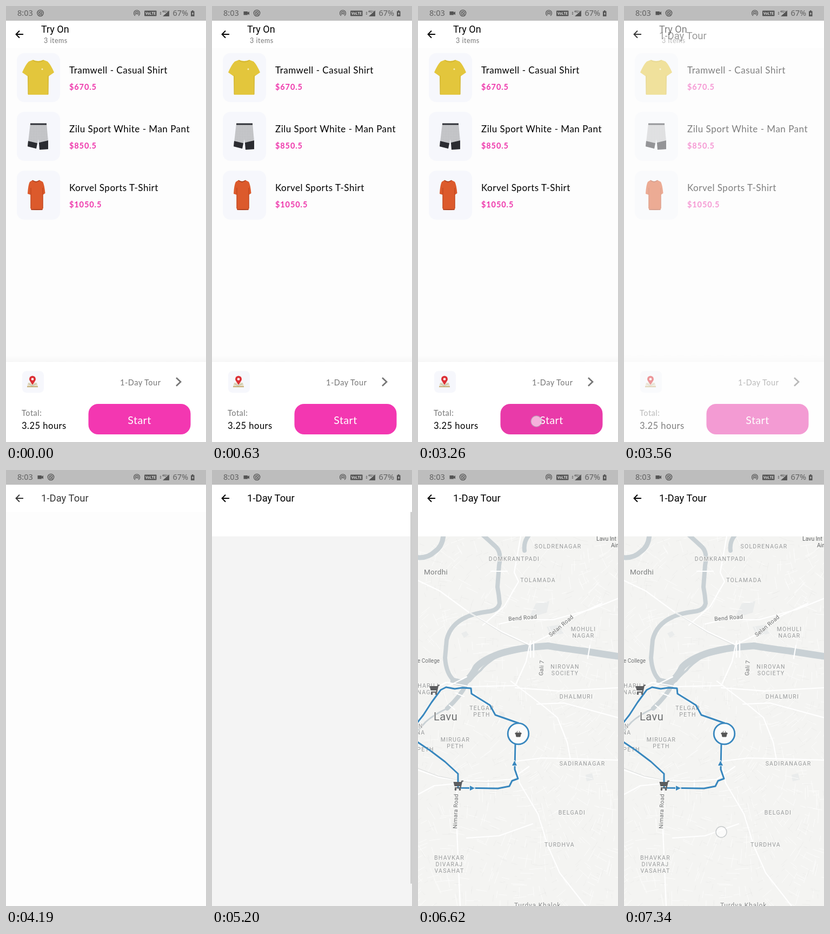
Recreate the animation shown at these times as an HTML page. Size 370 px wide and 801 px high, loop 8 s.

```html
<!DOCTYPE html>
<html lang="en">
<head>
<meta charset="utf-8">
<title>Try On</title>
<style>
  html, body { margin: 0; width: 100%; height: 100%; overflow: hidden; background: #fdfdfd; }
  svg { display: block; width: 370px; height: 801px; }
  .r { font-family: Roboto, sans-serif; }
  .l { font-family: Lato, sans-serif; letter-spacing: .5px; }
  .name { font-size: 17px; }
  .price { font-size: 14.5px; font-weight: 700; fill: #ee36ab; letter-spacing: .9px; }
  .grey { fill: #777; }
  #labels { font-family: Roboto, sans-serif; paint-order: stroke; stroke: #f6f6f4; stroke-width: 2px; stroke-linejoin: round; }
  .area { font-size: 10.5px; letter-spacing: 1.25px; fill: #989a9b; text-anchor: middle; }
  .road { font-size: 10.5px; letter-spacing: .3px; fill: #6d6f70; text-anchor: middle; }
  .line { fill: none; stroke-linecap: round; stroke-linejoin: round; }
</style>
</head>
<body>
<svg viewBox="0 0 370 801">
  <defs>
    <linearGradient id="shade" x2="0" y2="1"><stop stop-color="#fdfdfd"/><stop offset="1" stop-color="#f7f7f7"/></linearGradient>
    <pattern id="knit" width="3" height="3" patternUnits="userSpaceOnUse">
      <rect width="3" height="3" fill="#bfc0c3"/><circle cx="1" cy="1" r=".7" fill="#d9dadd"/>
    </pattern>
    <clipPath id="mapClip"><rect y="122" width="370" height="679"/></clipPath>
    <g id="cart" fill="#5c5d5f">
      <path d="M9-8.500H5.400L4.700-6H-9.500L-7.500 2H3L2.500 4H-7V6H4.200L7-6.500H9Z"/>
      <circle cx="2.500" cy="8" r="1.900"/><circle cx="-5.500" cy="8" r="1.900"/>
    </g>
    <path id="arrow" d="M-4-4.500 5 0-4 4.500Z" fill="#3887be" stroke="#f6f6f4" stroke-width="2" paint-order="stroke"/>
  </defs>

  <rect width="370" height="801" fill="#fdfdfd"/>
  <rect y="27" width="370" height="50" fill="#fff"/>

  <g id="list">
    <text class="r" x="65" y="49" font-size="18">Try On</text>
    <text class="l grey" x="70" y="68" font-size="12.500">3 items</text>
    <g fill="#f6f7fc">
      <rect x="20" y="86.500" width="80" height="90" rx="14"/>
      <rect x="20" y="194.500" width="80" height="90" rx="14"/>
      <rect x="20" y="302.500" width="80" height="90" rx="14"/>
    </g>
    <path d="M50 99Q59.500 103 69 99L77 102Q83 108 89 122L79 129 78 163H41L40 129 30 122Q36 108 42 102Z" fill="#e3c63c"/>
    <path d="M50 100q9.500 6 19 0M41 128v34M78 128v34" class="line" stroke="#cbae2c"/>
    <circle cx="67" cy="116" r="1.500" fill="#f5ecc0"/>
    <path d="M45 216H75L78 248V263L62 264 60 245 56 262 40 258Z" fill="url(#knit)"/>
    <path d="M41 248 58 252 56 262 40 258ZM61 251 78 247V263L62 264Z" fill="#2b2c31"/>
    <path d="M45 217H75" stroke="#303238" stroke-width="3"/>
    <path d="M49 320Q56 324 62 320L68 323Q71 328 72.500 344L68 347V374Q57 376 46 374V347L40 345Q41 328 44 323Z" fill="#dc5a2c"/>
    <path d="M49.500 320.500q6 5 12 0M47 374H67" class="line" stroke="#a63c1c" stroke-width="1.300"/>
    <path d="M46 334v38M68 334v38" stroke="#c34a20" stroke-width="1.500"/>
    <g class="l">
      <text class="name" x="117" y="124">Tramwell - Casual Shirt</text>
      <text class="name" x="117" y="232">Zilu Sport White - Man Pant</text>
      <text class="name" x="117" y="340">Korvel Sports T-Shirt</text>
      <text class="price" x="117" y="154">$670.5</text>
      <text class="price" x="117" y="262">$850.5</text>
      <text class="price" x="117" y="370">$1050.5</text>
    </g>
    <rect y="641" width="370" height="13" fill="url(#shade)"/>
    <rect y="654" width="370" height="147" fill="#fff"/>
    <rect x="30" y="670.500" width="40" height="40" rx="8" fill="#f6f7fc"/>
    <path d="M41 692H57L59 699H39Z" fill="#e6dcc4"/>
    <path d="M42 694 48 698 56 694" class="line" stroke="#a9b8a4"/>
    <path d="M39 699.500H59" stroke="#b6954b" stroke-width="1.300"/>
    <path d="M49 696C44 689 43 687 43 685.500A6 6 0 0 1 55 685.500C55 687 54 689 49 696Z" fill="#dc2f35"/>
    <circle cx="49" cy="685.500" r="2.300" fill="#fff"/>
    <text class="l grey" x="211" y="696.500" font-size="14.500">1-Day Tour</text>
    <path d="M315 683 323 690.500 315 698" fill="none" stroke="#757575" stroke-width="2.700"/>
    <text class="l grey" x="29" y="753" font-size="14.500">Total:</text>
    <text class="l" x="29" y="776.500" font-size="16.500">3.25 hours</text>
    <rect id="button" x="152.500" y="731" width="189" height="56" rx="18"/>
    <text class="l" x="247" y="767.500" font-size="19.500" fill="#fff" text-anchor="middle">Start</text>
  </g>

  <g id="tour">
    <text class="r" x="65" y="58" font-size="18.500">1-Day Tour</text>
  </g>
  <path d="M32 52H19M25 45.500 18.500 52 25 58.500" fill="none" stroke="#000" stroke-width="1.900" id="back"/>

  <g id="blank">
    <rect y="77" width="370" height="45" fill="#fff"/>
    <rect y="122" width="370" height="679" fill="#f4f4f4"/>
  </g>
  <g id="map" clip-path="url(#mapClip)">
    <rect y="122" width="370" height="679" fill="#f4f4f2"/>
    <path d="M218 245 243 241 238 262 205 272ZM238 288 262 284 270 300 246 306ZM80 300l9-4 5 7-9 5ZM150 443l9 2 2 8-10 2ZM310 560l12-3 3 12-13 3Z" fill="#eaecec"/>
    <path id="streets" class="line" stroke="#fcfcfb" stroke-width="1"/>
    <path id="lanes" class="line" stroke="#e9e9e7" stroke-width=".6"/>
    <g class="line" stroke="#c9d1d5">
      <path d="M47 118Q46 140 31 150 16 164-5 160" stroke-width="9"/>
      <path d="M116 116Q130 128 145 142 155 153 150 175L147 215Q150 230 151 245 148 258 130 260 105 263 90 270 60 283 53 312L50 345Q52 375 68 388" stroke-width="8"/>
      <path d="M375 343Q340 338 310 333 270 328 240 323L205 326Q170 331 150 338 120 349 108 362 98 382 84 392L66 388" stroke-width="12.500"/>
      <path d="M146 343Q124 357 116 368 106 376 96 388" stroke-width="4"/>
      <path d="M88 396Q78 416 54 438" stroke-width="8"/>
      <path d="M54 438Q28 450 14 463L-5 484" stroke-width="3"/>
      <path d="M205 120Q195 132 197 148" stroke-width="8"/>
    </g>
    <path class="line" stroke="#fff" stroke-width="2.200" d="M0 203 40 222 95 262 155 297 208 322M150 283 185 275 250 275 320 256 370 236M205 322 245 302 290 268 340 245M190 122 178 188 186 205 160 250 120 285M34 400 52 390 98 398 180 396 200 352 207 318M208 314V344M214 314V344M318 322 314 346M180 400 260 406 370 400M172 388 235 436 258 455 276 500 282 532M181 535 230 529 370 533M185 484 180 535 188 575 222 632 240 690 262 740 310 801M0 551 40 565 75 570 130 572 172 568 205 545M72 570 71 640 78 801M98 405 143 448 185 466M0 466 40 405 90 380M135 186 165 186M70 410 85 416M58 432 68 440M75 586H130V570M90 676 150 672 212 650M0 596 30 580 72 576M220 430 270 428 370 455"/>
    <path class="line" stroke="#d5d7d7" stroke-width=".8" d="M0 548 36 562 95 574 160 574M95 262 155 299 206 323"/>
  </g>
  <g clip-path="url(#mapClip)"><g id="labels"></g></g>
  <g id="route" class="line" stroke="#3887be" stroke-width="3">
    <path d="M-5 469 10 450 25 427 42 404 52 399 68 402 82 400 98 401 99 411 133 432 143 450 186 465M180 504 179 550 185 567 174 571 169 581 148 585 74 584V558L50 536 22 515-5 497"/>
    <use href="#arrow" x="100" y="584.500"/>
    <use href="#arrow" transform="translate(178.500 539) rotate(-90)"/>
  </g>
  <g id="pins">
    <use href="#cart" x="31" y="403"/>
    <use href="#cart" x="75" y="579"/>
    <circle cx="185.500" cy="484.500" r="19.300" fill="#fbfbfb" id="ring"/>
    <path d="M180 483H191V485H190L189 490H182L181 485H180ZM182 484 184 479.500M189 484 187 479.500" fill="#555" stroke="#555" stroke-width="1"/>
  </g>
  <rect id="bar" x="367" y="77" width="3" height="683" rx="1" fill="#cfcfcf"/>

  <rect width="370" height="27" fill="#bdbdbd"/>
  <g fill="#555" font-family="Noto Sans, sans-serif">
    <text x="21" y="18" font-size="14.500" fill="#606060">8:03</text>
    <path id="camera" d="M58.500 10H66V12L69 10V16.500L66 14.500V16.500H58.500Z"/>
    <g id="badge" class="line" stroke="#555" stroke-width="1.300"><circle r="5.700"/><path d="M-2.500-2.500 3 3M-.5-3A3 3 0 0 1 3 .5M-3-.5A3 3 0 0 0 .5 3"/></g>
    <g class="line" stroke="#555" stroke-width="1.200"><path d="M238.500 17.500A5.500 5.500 0 1 1 245.500 17.500M240.200 15.500A3 3 0 1 1 243.800 15.500"/></g>
    <circle cx="242" cy="13.500" r="1.300"/>
    <rect x="256" y="8.500" width="22.500" height="10" rx="1"/>
    <text x="267.300" y="16" font-size="6.500" font-weight="700" fill="#ddd" text-anchor="middle">VoLTE</text>
    <path d="M284.500 12.500 286 10.500 287.500 12.500ZM284.500 14 286 16 287.500 14ZM290 19 302 8V19Z"/>
    <text x="289" y="11.500" font-size="5.500" font-weight="700">4G+</text>
    <text x="308.500" y="18" font-size="14.500" fill="#606060">67%</text>
    <path d="M342 9.500H344V8H346.500V9.500H348.500V19H342Z"/>
    <path d="M345.800 11 343.800 14.500H345.200L344.600 17.500 347 13.500H345.500Z" fill="#ddd"/>
  </g>
  <circle id="touch" r="10" fill="#fff" fill-opacity=".6" stroke="#a9adb0" stroke-opacity=".6" stroke-width="1.500"/>
</svg>

<script>
const $ = id => document.getElementById(id);
const set = (id, key, value) => $(id).setAttribute(key, value);
const fade = (id, value) => set(id, 'opacity', value);

// Fine street grid, seeded so that it never changes
let seed = 7;
const rnd = () => (seed = seed * 16807 % 2147483647) / 2147483647;
function streets(count, reach) {
  let d = '';
  for (let i = 0; i < count; i++) {
    const x = rnd() * 370, y = 122 + rnd() * 679;
    const a = Math.sin(x / 90) + Math.cos(y / 110) + (i % 2) * Math.PI / 2;
    const r = reach * (.3 + rnd());
    const dx = Math.cos(a) * r, dy = Math.sin(a) * r;
    d += `M${x.toFixed(1)} ${y.toFixed(1)}l${dx.toFixed(1)} ${dy.toFixed(1)}`;
  }
  return d;
}
set('streets', 'd', streets(700, 20));
set('lanes', 'd', streets(600, 11));

function label(cls, text, x, y, attrs = {}) {
  const el = document.createElementNS('http://www.w3.org/2000/svg', 'text');
  el.setAttribute('class', cls);
  el.setAttribute('x', x);
  el.setAttribute('y', y);
  for (const key in attrs) el.setAttribute(key, attrs[key]);
  el.textContent = text;
  $('labels').append(el);
}
[
  ['SOLDRENAGAR', 259, 144], ['DOMKRANTPADI', 178, 167], ['TOLAMADA', 222, 206],
  ['MOHULI|NAGAR', 306, 296], ['NIROVAN|SOCIETY', 272, 365], ['DHALMURI', 293, 420],
  ['TELGAR|PETH', 118, 441], ['MIRUGAR|PETH', 69, 499], ['SADIRANAGAR', 304, 543],
  ['BELGADI', 285, 633], ['TURDHVA', 262, 692], ['BHAVKAR|DIVARAJ|VASAHAT', 58, 716],
  ['HARUJ', 19, 400], ['NAG', 11, 412], ['N|NA', 5, 474], ['PETH', 14, 517]
].forEach(([text, x, y]) => text.split('|').forEach((s, i) => label('area', s, x, y + i * 12)));
[
  ['Bend Road', 194, 275, -5], ['Selan Road', 267, 289, -40], ['Gali 7', 232, 364, -86], ['Nimara Road', 73, 627, -88]
].forEach(([text, x, y, a]) => label('road', text, x, y, { transform: `rotate(${a} ${x} ${y})` }));
label('', 'Mordhi', 11, 192, { 'font-size': 13.5, fill: '#7b7d7e', 'letter-spacing': .3 });
label('', 'Lavu', 29, 460, { 'font-size': 20, fill: '#6b6d6e', 'letter-spacing': .5 });
label('', 'e College', -1, 354, { 'font-size': 10, fill: '#6d6f70' });
label('', 'Lavu Int', 330, 130, { 'font-size': 10.5, fill: '#606263' });
label('', 'Air', 357, 142, { 'font-size': 10.5, fill: '#606263' });
label('', 'Turdva Khalok', 221, 804, { 'font-size': 12, fill: '#8b8d8e', 'letter-spacing': .8, 'text-anchor': 'middle' });

const ramp = (t, a, b) => Math.min(1, Math.max(0, (t - a) / (b - a)));
const ease = x => x * x * (3 - 2 * x);

// start, end, x, y
const taps = [[1670, 1820, 208, 400], [3260, 3400, 219, 763], [7240, 8000, 180, 665]];

function draw(t) {
  const swap = ease(ramp(t, 3360, 3760));
  fade('list', 1 - swap);
  set('tour', 'transform', `translate(0 ${6 * (1 - swap)})`);
  const ink = t < 4790 ? .78 : 1;
  fade('tour', swap * ink);
  fade('back', t < 3560 ? 1 : ink);

  const recording = t >= 100;
  fade('camera', +recording);
  set('badge', 'transform', `translate(${recording ? 83 : 63.5} 13)`);

  const pressed = t >= 3260;
  set('button', 'fill', pressed ? '#e93aa9' : '#f337b1');

  fade('bar', t < 4790 ? 0 : 1 - ramp(t, 5310, 5610));
  fade('blank', +(t >= 5200));
  fade('map', ramp(t, 5310, 5610));
  fade('labels', ramp(t, 5500, 5800));
  fade('pins', +(t >= 5510));

  const routed = t >= 6420;
  fade('route', ramp(t, 6320, 6620));
  set('ring', 'stroke', routed ? '#3887be' : '#73797e');
  set('ring', 'stroke-width', routed ? 2.8 : 3.2);

  const tap = taps.find(([a, b]) => t >= a && t < b);
  fade('touch', +!!tap);
  if (tap) set('touch', 'transform', `translate(${tap[2]} ${tap[3]})`);
}

function tick(now) {
  draw(now % 8000);
  requestAnimationFrame(tick);
}
draw(0);
requestAnimationFrame(tick);
</script>
</body>
</html>
```
